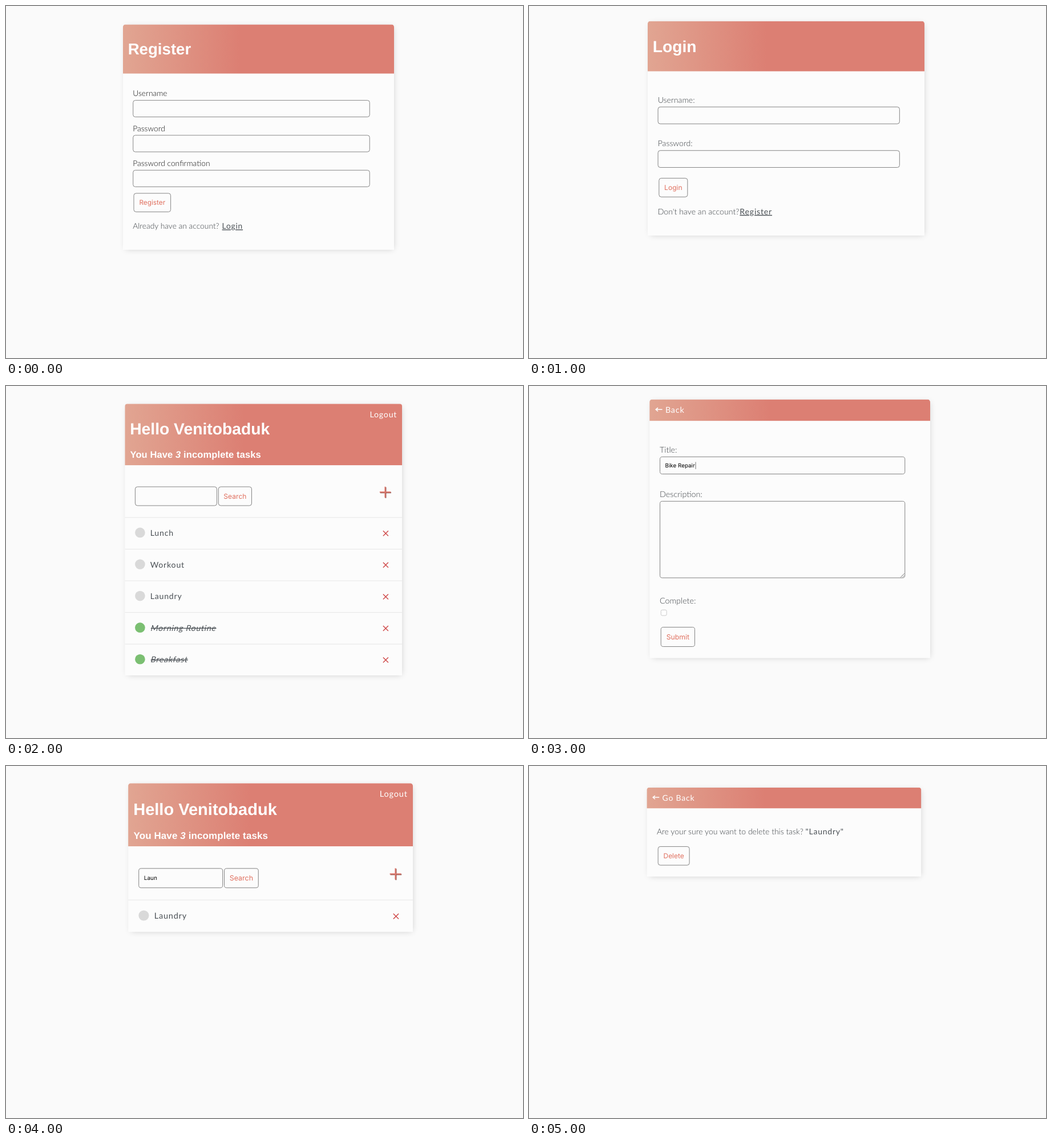
Write an HTML page that moves like this. It is 906x618 px and loops after 6 s.

```html
<!DOCTYPE html>
<html lang="en">
<head>
<meta charset="utf-8">
<title>Task list</title>
<style>
  html, body { margin: 0; width: 100%; height: 100%; overflow: hidden; background: #fafafa; }
  .page {
    position: absolute;
    left: 0;
    top: 0;
    width: 550px;
    overflow: hidden;
    opacity: 0;
    transform-origin: 0 0;
    border-radius: 5px 5px 0 0;
    box-shadow: 2px 2px 13px -4px rgba(0, 0, 0, .21);
    background: linear-gradient(90deg, #e1a592, #dc7f73 43%) 0 0 / 100% var(--bar) no-repeat, #fcfcfc;
    text-rendering: geometricPrecision;
  }
  text { font: 300 16px Lato, "Open Sans", sans-serif; fill: #4b5156; white-space: pre; }
  .label { fill: #3c4145; }
  .dark { fill: #111; }
  .link { font-weight: 400; letter-spacing: .9px; }
  .under { text-decoration: underline; }
  .done { text-decoration: line-through; letter-spacing: .8px; }
  .white, .h1, .h3 { fill: #fff; }
  .h1, .h3 { font: 700 32px "Liberation Sans", Arial, sans-serif; }
  .h3 { font-size: 18.72px; letter-spacing: .12px; }
  .input { font: 400 11px Inter, sans-serif; fill: #000; }
  .button { font: 400 13.7px Inter, sans-serif; fill: #e0705f; text-anchor: middle; }
  .box { fill: none; stroke: #757575; }
  .check { fill: #fff; stroke: #c4c4c4; }
  .rule { stroke: #e4e4e4; }
  .arrow { fill: none; stroke: #fff; stroke-width: 1.7; }
  .grip { fill: none; stroke: #666; }
  .cross { fill: none; stroke: #cf4949; stroke-width: 1.6; }
  .plus { fill: none; stroke: #e07a6e; stroke-width: 2.2; filter: drop-shadow(1px 1px .5px #81413b); }
</style>
</head>
<body>
<script>
const WIDTH = 550, HOLD = 1000;

const text = (cls, x, y, s) => `<text class="${cls}" x="${x}" y="${y}">${s}</text>`;
const path = (cls, d) => `<path class="${cls}" d="${d}"/>`;
const box = (x, y, w, h, cls = "box", r = 4.5) =>
  `<rect class="${cls}" x="${x + .5}" y="${y + .5}" width="${w - 1}" height="${h - 1}" rx="${r}"/>`;

const button = (x, y, w, h, s) => box(x, y, w, h) + text("button", x + w / 2, y + h / 2 + 5, s);
const field = (y, label, shade = "", h = 34.7) =>
  text("label " + shade, 20, y - 8, label) + box(20, y, 481, h);
const prompt = (y, s, linkX, link, cls = "under") =>
  text("label", 20, y, s) + text("link " + cls, linkX, y, link);
const title = s => text("h1", 10, 61.3, s);
const back = s => path("arrow", "M25 19.8H12.5M16.5 16.2L12.3 19.8L16.5 23.4") + text("link white", 31, 26.5, s);

function task(y, name, done) {
  const label = done
    ? `<g transform="translate(50.3 ${y + 37}) skewX(-13)">${text("link done", 0, 0, name)}</g>`
    : text("link", 50.2, y + 37, name);
  return path("rule", `M0 ${y + .5}H${WIDTH}`) +
    `<circle cx="30.1" cy="${y + 30.6}" r="10" fill="${done ? "#7bbf72" : "#d9d9d9"}"/>` + label +
    path("cross", `M512.3 ${y + 27}l10.2 10.2m0 -10.2l-10.2 10.2`);
}

function taskList(query, tasks) {
  return title("Hello Venitobaduk") +
    text("h3", 10.4, 107.7, 'You Have <tspan font-style="italic">3</tspan> incomplete tasks') +
    text("link white", 485.8, 26.4, "Logout") +
    box(20, 164.4, 163, 38.4) + text("input", 30.5, 187.5, query) +
    button(185.2, 164.4, 66.8, 38.4, "Search") +
    path("plus", "M505.5 175.4h21.6m-10.8 -10.8v21.6") +
    tasks.map(([name, done], i) => task(225.4 + i * 62.9, name, done)).join("");
}

const pages = [
  { x: 205, y: 32.4, width: 475, height: 458, bar: 99.8, art:
    title("Register") +
    ["Username", "Password", "Password confirmation"]
      .map((label, i) => field(153.8 + i * 71, label, "dark")).join("") +
    button(21.5, 342.8, 75.8, 38.7, "Register") +
    prompt(415.7, "Already have an account?", 201, "Login") },

  { x: 208, y: 26.6, width: 485, height: 427, bar: 99.8, art:
    title("Login") + field(170.3, "Username:") + field(257.1, "Password:") +
    button(22, 312.2, 57.7, 38.3, "Login") +
    prompt(384.8, "Don't have an account?", 183, "Register") },

  { x: 208.3, y: 31.3, width: 485.9, height: 539.7, bar: 122, art:
    taskList("", [["Lunch"], ["Workout"], ["Laundry"], ["Morning Routine", true], ["Breakfast", true]]) },

  { x: 211.2, y: 23.6, width: 491.8, height: 507.8, bar: 42, art:
    back("Back") + field(112.2, "Title:") +
    text("input", 30.5, 133.6, "Bike Repair") + path("grip", "M90.4 122.8v14") +
    field(199.4, "Description:", "", 151.4) + path("grip", "M492.2 349l7.2 -7.2M496.2 349l3.2 -3.2") +
    text("label", 20, 400.8, "Complete:") + box(22, 412.8, 12, 12, "check", 2.5) +
    button(21.9, 446.7, 67.3, 39, "Submit") },

  { x: 214.1, y: 30.3, width: 498.9, height: 288.3, bar: 122, art:
    taskList("Laun", [["Laundry"]]) },

  { x: 206.4, y: 37.8, width: 481, height: 179.2, bar: 41.7, art:
    back("Go Back") +
    prompt(94, "Are your sure you want to delete this task?", 318, '"Laundry"', "") +
    button(22.1, 118, 63.8, 38.4, "Delete") },
];

document.body.innerHTML = pages.map(({ x, y, width, height, bar, art }) =>
  `<svg class="page" viewBox="0 0 ${WIDTH} ${height}" style="height:${height}px;--bar:${bar}px;` +
  `transform:translate(${x}px,${y}px) scale(${width / WIDTH})">${art}</svg>`
).join("");

const share = 1 / pages.length, duration = HOLD * pages.length;
document.querySelectorAll(".page").forEach((page, i) => page.animate(
  [{ opacity: 1 }, { opacity: 1, offset: share }, { opacity: 0, offset: share }, { opacity: 0 }],
  { duration, delay: i * HOLD - duration, iterations: Infinity }
));
</script>
</body>
</html>
```
